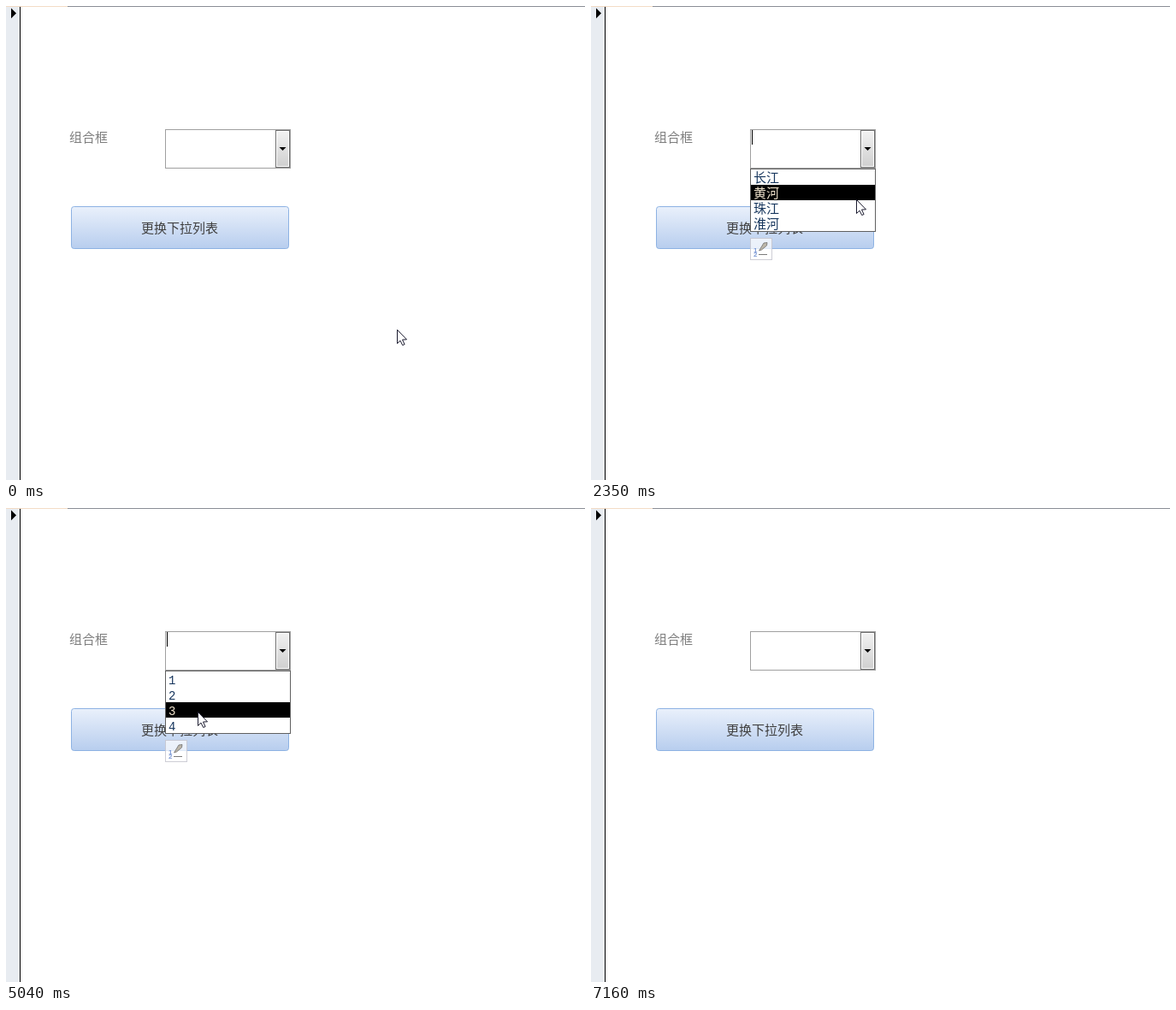
Animation, 677 px wide and 554 px high, one loop 7.24 s. Source, as an HTML page with a canvas:

```html
<!DOCTYPE html>
<html lang="zh-CN">
<head>
<meta charset="utf-8">
<style>
  html, body { margin: 0; width: 677px; height: 554px; overflow: hidden; background: #fff; }
  canvas { display: block; }
</style>
</head>
<body>
<canvas id="stage" width="677" height="554"></canvas>
<script>
const ctx = document.getElementById('stage').getContext('2d');
const LOOP = 7240, START = 300, TICK = 79;
const SANS = '15px "Noto Sans CJK SC", "Noto Sans CJK", sans-serif';
const MONO = '14px "Liberation Mono", monospace';
const ICON = 'bold 8px "Liberation Sans", sans-serif';

// Times below count screen updates (ticks).
const lists = [
  { items: ['长江', '黄河', '珠江', '淮河'], font: SANS, open: 11, close: 30, lastRow: 1 },
  { items: ['1', '2', '3', '4'], font: MONO, open: 54, close: 74, lastRow: 0 },
];
const CLICK = 39;
const HOME = [457, 378];

// Pointer moves: start, end, destination
const moves = [
  [-1, 9, 323, 177],
  [14, 18, 312, 222],
  [20, 23, 310, 242],
  [24, 26, 310, 226],
  [26, 28, 451, 175],
  [32, 38, 272, 270],
  [42, 48, 328, 191],
  [48, 50, 320, 172],
  [57, 60, 224, 238],
  [62, 66, 270, 209],
  [67, 70, 434, 201],
  [70, 71, 609, 198],
  [77, 80, 642, 560],
];

function pointerAt(n) {
  let [x, y] = HOME;
  for (const [start, end, toX, toY] of moves) {
    const u = Math.min(1, Math.max(0, (n - start) / (end - start)));
    const ease = u * u * (3 - 2 * u);
    x += (toX - x) * ease;
    y += (toY - y) * ease;
  }
  return [Math.round(x), Math.round(y)];
}

const inside = ([px, py], x, y, w, h) => px >= x && px < x + w && py >= y && py < y + h;

function rect(x, y, w, h, fill) {
  ctx.fillStyle = fill;
  ctx.fillRect(x, y, w, h);
}

function frame(x, y, w, h, color) {
  ctx.strokeStyle = color;
  ctx.strokeRect(x + .5, y + .5, w - 1, h - 1);
}

function text(str, x, y, color, font = SANS) {
  ctx.font = font;
  ctx.fillStyle = color;
  ctx.fillText(str, x, y);
}

function shape(points, fill, stroke) {
  ctx.beginPath();
  points.forEach(([x, y]) => ctx.lineTo(x, y));
  ctx.closePath();
  ctx.fillStyle = fill;
  ctx.fill();
  if (stroke) {
    ctx.strokeStyle = stroke;
    ctx.stroke();
  }
}

function gradient(y0, y1, [top, bottom]) {
  const g = ctx.createLinearGradient(0, y0, 0, y1);
  g.addColorStop(0, top);
  g.addColorStop(1, bottom);
  return g;
}

function drawForm() {
  rect(0, 0, 677, 554, '#fff');
  rect(0, 0, 16, 554, '#e8ecf1');
  rect(16, 0, 1, 554, '#000');
  rect(0, 0, 72, 1, '#f3dcc6');
  rect(72, 0, 605, 1, '#8b8e96');
  shape([[6, 2.5], [12, 8.5], [6, 14.5]], '#000');
  text('组合框', 74, 159, '#7f7f7f');
}

function drawButton(pressed, hover, focus) {
  const colors = pressed ? ['#b3c9ea', '#d3e1f6'] : hover ? ['#f1f6fe', '#cbdcf6'] : ['#e9f0fb', '#b7cdee'];
  ctx.beginPath();
  ctx.roundRect(76.5, 234.5, 254, 49, 3);
  ctx.fillStyle = gradient(235, 284, colors);
  ctx.fill();
  ctx.strokeStyle = '#8db2e3';
  ctx.stroke();
  if (focus) {
    ctx.setLineDash([1, 1]);
    ctx.lineDashOffset = .5;
    frame(77, 235, 253, 48, '#1f3f7f');
    ctx.setLineDash([]);
  }
  text('更换下拉列表', 158, 265, '#404040');
}

function drawCombo(pressed, hover, caret) {
  rect(186, 144, 147, 46, '#fff');
  frame(186, 144, 147, 46, '#a0a0a0');
  const colors = pressed ? ['#c9e6f6', '#8cc8e8'] : hover ? ['#e6f5fd', '#aadbf5'] : ['#f1f1f1', '#d0d0d0'];
  rect(315, 145, 17, 44, '#fff');
  rect(317, 147, 13, 40, gradient(147, 187, colors));
  frame(315, 145, 17, 44, pressed || hover ? '#3c7fb1' : '#707070');
  shape([[319.5, 165], [327.5, 165], [323.5, 169]], '#000');
  if (caret) rect(188, 145, 1, 17, '#000');
}

function drawList({ items, font, lastRow }, [px, py]) {
  const active = px > 332 ? lastRow : Math.floor((py - 191) / 18);
  rect(186, 190, 147, 74, '#fff');
  items.forEach((item, i) => {
    const y = 191 + i * 18;
    if (i === active) rect(187, y, 145, 18, '#000');
    text(item, 190, y + 15, i === active ? '#f3e6d0' : '#17365d', font);
  });
  frame(186, 190, 147, 74, '#606060');
}

function drawEditIcon() {
  ctx.globalAlpha = .7;
  rect(186, 271, 26, 26, '#fff');
  frame(186, 271, 26, 26, '#b8b8c4');
  text('1', 190, 288, '#4a72c4', ICON);
  text('2', 190, 293, '#4a72c4', ICON);
  rect(196, 290, 10, 1, '#444');
  shape([[196.5, 286], [202, 277], [206, 276.5], [205.5, 280], [199.5, 285]], '#a89c86', '#666');
  ctx.globalAlpha = 1;
}

function drawPointer([x, y]) {
  const outline = [[0, 0], [0, 16], [3.5, 12.6], [6.2, 18], [8.6, 17], [6, 11.5], [11, 11.3]];
  shape(outline.map(([dx, dy]) => [x + dx + .5, y + dy + .5]), '#fff', '#1c1c30');
}

function draw(t) {
  const n = Math.floor((t - START) / TICK + .2);
  const pointer = pointerAt(n);
  const list = n < CLICK ? lists[0] : lists[1];
  const open = n >= list.open && n < list.close;
  const caret = n >= list.open && (n - list.open) % 13 < 7;

  drawForm();
  drawButton(n === CLICK, !open && inside(pointer, 76, 234, 255, 50), n >= CLICK && n < list.open);
  drawCombo(n === list.open - 1, inside(pointer, 315, 145, 17, 44), caret);
  if (open) {
    drawList(list, pointer);
    drawEditIcon();
  }
  drawPointer(pointer);
}

const begin = performance.now();
function tick() {
  draw((performance.now() - begin) % LOOP);
  requestAnimationFrame(tick);
}
tick();
</script>
</body>
</html>
```
